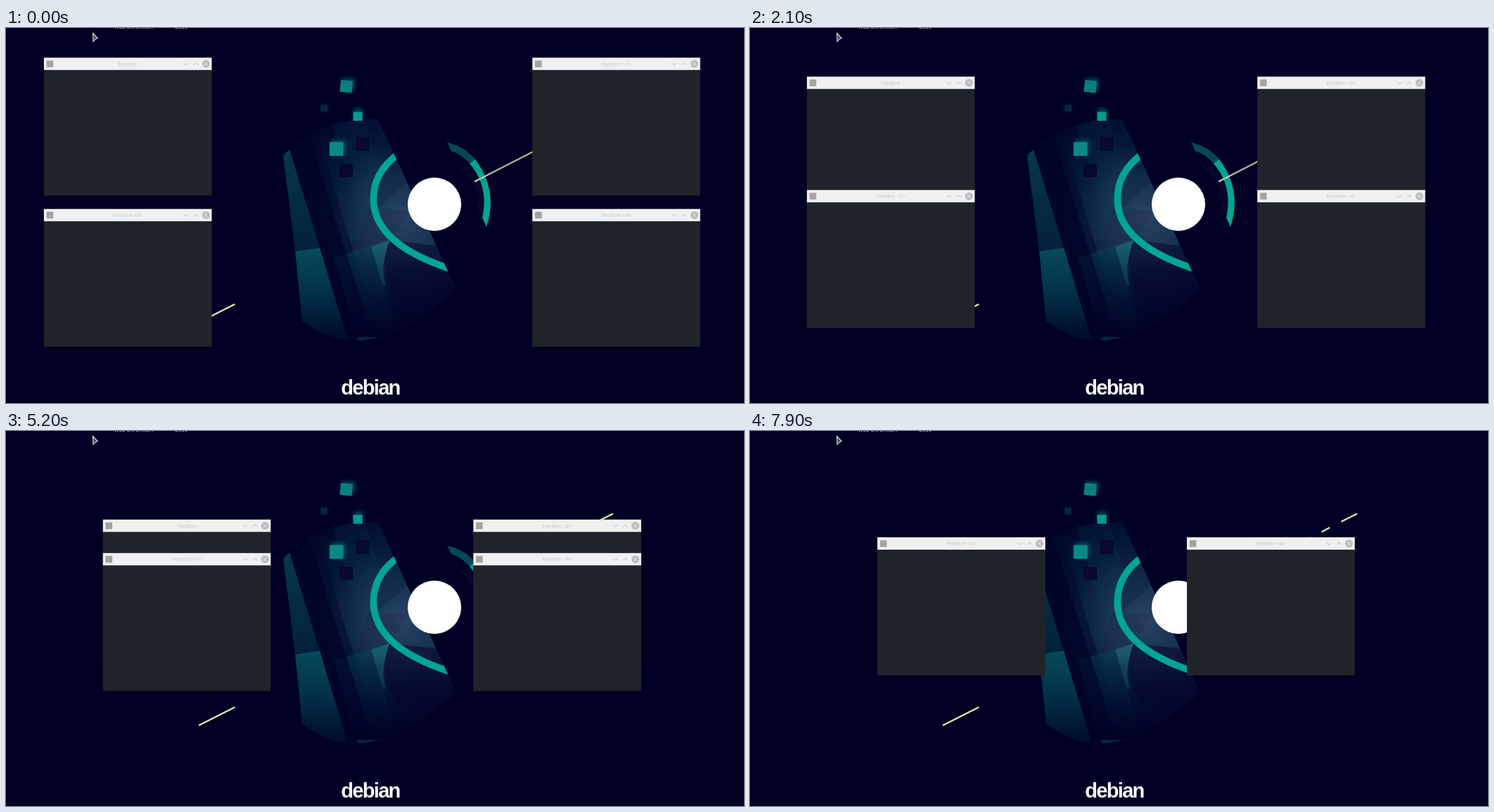
These frames come from a looping animation (1049x534 px, 8000 ms). An HTML page:

```html
<!DOCTYPE html>
<html lang="fr">
<head>
<meta charset="utf-8">
<title>Fenêtres</title>
<style>
@property --d { syntax: "<number>"; inherits: true; initial-value: 0; }

html, body { margin: 0; width: 100%; height: 100%; overflow: hidden; background: #000025; }
svg { display: block; width: 100%; height: 100%; }
#stage { animation: gather 8s linear infinite; }

/* --d is how far every window has travelled towards the middle */
@keyframes gather {
  0%     { --d: 0;     animation-timing-function: steps(9); }
  11.25% { --d: 11.7;  animation-timing-function: steps(9); }
  22.5%  { --d: 23.2;  animation-timing-function: steps(6); }
  30%    { --d: 30.8;  animation-timing-function: steps(1); }
  36.25% { --d: 51;    animation-timing-function: steps(8); }
  46.25% { --d: 61.6;  animation-timing-function: steps(9); }
  57.5%  { --d: 75;    animation-timing-function: steps(9); }
  68.75% { --d: 88.3;  animation-timing-function: steps(4); }
  73.75% { --d: 94.8;  animation-timing-function: steps(5); }
  80%    { --d: 104.8; animation-timing-function: steps(9); }
  91.25% { --d: 118;   animation-timing-function: steps(6); }
  98.75%, 100% { --d: 127.2; }
}

.win { transform: translate(calc((var(--x) + var(--dir) * var(--d)) * 1px), calc(var(--y) * 1px)); }
.left { --x: 53.9; --dir: 1; }
.right { --x: 748.2; --dir: -1; }
.upper { --y: min(42.3 + var(--d), 151.5); }
.lower { --y: max(257.7 - var(--d), 151.5); }

text { font: 7.6px "Noto Sans", sans-serif; }
.win text { fill: #c3c6c9; text-anchor: middle; }
.label { fill: #d8d8dc; }
.wordmark { font: bold 29px "Liberation Sans", Arial, sans-serif; letter-spacing: -1.7px; fill: #fff; text-anchor: middle; }
</style>
</head>
<body>
<svg id="stage" viewBox="0 0 1049 534" preserveAspectRatio="none">
  <defs>
    <radialGradient id="haze" gradientUnits="userSpaceOnUse" cx="562" cy="270" r="165">
      <stop offset="0" stop-color="#2a4264"/>
      <stop offset=".35" stop-color="#163150"/>
      <stop offset=".65" stop-color="#05193a"/>
      <stop offset="1" stop-color="#01082a"/>
    </radialGradient>
    <linearGradient id="wedgeTop" x1="0" y1="0" x2="0" y2="1">
      <stop offset="0" stop-color="#053849"/>
      <stop offset="1" stop-color="#03203c"/>
    </linearGradient>
    <linearGradient id="wedgeLow" x1="0" y1="0" x2="0" y2="1">
      <stop offset="0" stop-color="#054c5a"/>
      <stop offset=".45" stop-color="#033248"/>
      <stop offset="1" stop-color="#000a2b"/>
    </linearGradient>
    <linearGradient id="fade" x1="0" y1="0" x2="0" y2="1">
      <stop offset="0" stop-color="#000025" stop-opacity="0"/>
      <stop offset="1" stop-color="#000025"/>
    </linearGradient>
    <linearGradient id="beam" gradientUnits="userSpaceOnUse" x1="666" y1="0" x2="797" y2="0">
      <stop offset="0" stop-color="#d2d0bd"/>
      <stop offset=".3" stop-color="#b0ae9b"/>
      <stop offset="1" stop-color="#c2c2a0"/>
    </linearGradient>
    <filter id="glow" x="-60%" y="-60%" width="220%" height="220%"><feGaussianBlur stdDeviation="3"/></filter>
    <clipPath id="body">
      <path d="M403 173Q450 127 529 130L640 372Q612 398 557 432Q520 446 486 445Z"/>
    </clipPath>
    <clipPath id="slant"><path d="M480 100H515L655 405H480Z"/></clipPath>

    <g id="frame">
      <rect width="238.5" height="196.3" fill="#20242a"/>
      <rect width="238.5" height="17.5" fill="#eff0f1"/>
      <rect x="3.7" y="4" width="9.6" height="9.6" fill="#a5a3a2"/>
      <g fill="none" stroke="#b4b7ba" stroke-width=".9">
        <path d="M198.4 7.2l3.5 3.5 3.5-3.5M212.8 10.7l3.5-3.5 3.5 3.5"/>
        <circle cx="230.3" cy="8.8" r="5.5" fill="#b9bcbf" stroke="none"/>
        <path d="M227.8 6.3l5 5m0-5l-5 5" stroke="#eff0f1"/>
      </g>
    </g>
  </defs>

  <rect width="1049" height="534" fill="#000025"/>

  <!-- wallpaper: slanted panels -->
  <g clip-path="url(#body)">
    <rect x="394" y="125" width="250" height="325" fill="url(#haze)"/>
    <path d="M403 173L486 445H521L430 148Z" fill="#010427" opacity=".85"/>
    <path d="M430 148L521 445H532L440 140Z" fill="#02082b" opacity=".5"/>
    <path d="M462 130L557 434H605L509 125Z" fill="#0a4a60" opacity=".12"/>
    <path d="M467 327L519 310L557 434L521 445H500Z" fill="#064052" opacity=".55"/>
    <path d="M467 327L484 321L521 440H500Z" fill="#020a2e" opacity=".7"/>
    <path d="M527 130Q552 200 508 274L570 220Z" fill="#031a3a" opacity=".25"/>
    <path d="M508 274Q530 255 572 262L546 302L500 316Z" fill="#241c48" opacity=".25"/>
    <path d="M519 311L546 302Q530 340 540 366L536 368Z" fill="#1d7d82" opacity=".5"/>
    <path d="M546 302C529 340 537 385 590 405L645 378L612 310Z" fill="#0a0b32" opacity=".62"/>
    <rect x="394" y="315" width="250" height="125" fill="url(#fade)"/>
  </g>
  <path d="M394 181L403 173L446 313L411 318Z" fill="url(#wedgeTop)"/>
  <path d="M411 318L446 313L486 445Q450 440 421 417Z" fill="url(#wedgeLow)"/>

  <!-- wallpaper: rings -->
  <path clip-path="url(#slant)" d="M562 177C531 196 522.3 222 522.3 243C522.3 288 561 319.5 629 342" fill="none" stroke="#00a594" stroke-width="9.8"/>
  <path d="M643 203L655 195L681 226L679 280L668 250L674 247L664 222L652 205Z" fill="#08062b"/>
  <path d="M627 163Q652 169 667 187L659 193Q648 180 633 175Z" fill="#034a56"/>
  <path d="M667 187Q700 231 683 283L677 270Q687 226 659 193Z" fill="#00a594"/>
  <circle cx="609" cy="251" r="38" fill="#fff"/>

  <!-- wallpaper: floating squares -->
  <g fill="#087f7d">
    <g filter="url(#glow)" opacity=".6">
      <path d="M477 72h18v18h-18zM494 115h13v15h-13zM462 160h20v20h-20z"/>
      <path d="M446 108h11v11h-11z" opacity=".3"/>
    </g>
    <rect x="475.3" y="74.8" width="17" height="17" transform="rotate(6 484 83)"/>
    <rect x="493.5" y="119.5" width="13" height="12.5" fill="#079a8f"/>
    <rect x="460" y="162.5" width="19.5" height="19.5" fill="#078a84"/>
    <rect x="447.5" y="109.5" width="9.5" height="9.5" fill="#08253f"/>
    <path d="M497 155h20v20h-20z" fill="#080a33"/>
    <path d="M474 193.5h19v19h-19z" fill="#07082f"/>
  </g>

  <!-- wallpaper: beams -->
  <g fill="none" stroke="#e6e8b4" stroke-width="2.3">
    <path d="M274 419.3L325.3 393.3M840.5 129L863 117.8M812.5 143.7L824 137.6"/>
    <path d="M666 218.7L797 151.5" stroke="url(#beam)"/>
  </g>

  <text class="wordmark" x="518" y="522">debian</text>
  <text class="label" x="153.5" y="1.2">Web Chromium</text>
  <text class="label" x="239.5" y="1.2">Code</text>

  <g class="win left upper"><use href="#frame"/><text x="119.3" y="11.4">Fenêtre</text></g>
  <g class="win right upper"><use href="#frame"/><text x="119.3" y="11.4">Fenêtre &lt;2&gt;</text></g>
  <g class="win left lower"><use href="#frame"/><text x="119.3" y="11.4">Fenêtre &lt;3&gt;</text></g>
  <g class="win right lower"><use href="#frame"/><text x="119.3" y="11.4">Fenêtre &lt;4&gt;</text></g>

  <path d="M123.6 7.4L130 14.6L127.6 15.4L124 19.2Z" fill="#4a4c50" stroke="#e2e2e4" stroke-width="1.1"/>
</svg>
</body>
</html>
```
